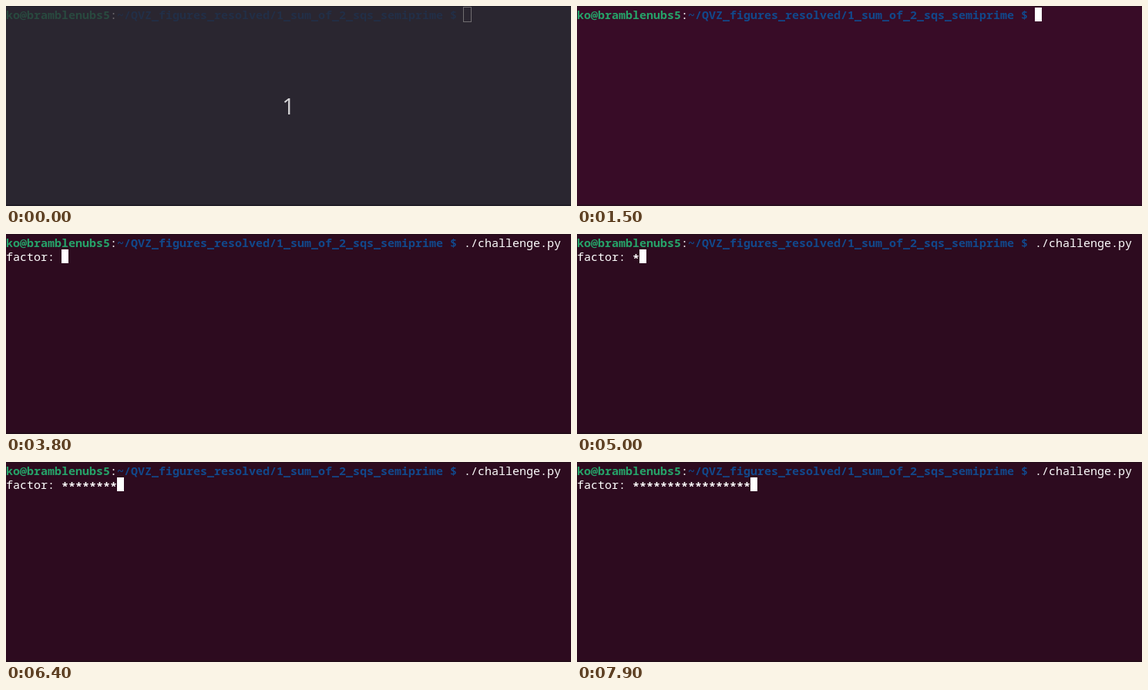
These frames come from a looping animation (733 by 260 pixels, 8 s). An HTML page:

```html
<!DOCTYPE html>
<html lang="en">
<head>
<meta charset="utf-8">
<title>Terminal</title>
<style>
  html, body { margin: 0; width: 100%; height: 100%; overflow: hidden; }
  svg {
    --bg: #2d0b1f; --edge: #230c1a; --user: #26a269; --path: #12488b; --ink: #fff;
    display: block; width: 733px; height: 260px; background: var(--bg);
  }
  svg.idle { --bg: #380c27; --edge: #2a0e20; }
  svg.dim {
    --bg: #2a2630; --edge: #201d27; --user: #29493f;
    --path: #222f47; --ink: #706d70;
  }
  text {
    font: 500 15px "Noto Sans Mono", "DejaVu Sans Mono", monospace;
    fill: var(--ink); white-space: pre;
  }
  .bold { font-weight: 700; }
  .user { fill: var(--user); }
  .path { fill: var(--path); }
  .edge { fill: var(--edge); }
  #stars { font-weight: 600; }
  #count { font: 29px "Open Sans", "Noto Sans", sans-serif; fill: #d6d5d7; text-anchor: middle; }
  #block { fill: #fff; }
  #hollow { fill: none; stroke: var(--ink); }
</style>
</head>
<body>
<svg id="term" class="dim" viewBox="0 0 733 260">
  <rect class="edge" width="733" height="1"/>
  <rect class="edge" y="258" width="733" height="2"/>
  <text class="bold user" x="0" y="17">ko@bramblenubs5</text>
  <text x="135" y="17">:</text>
  <text class="bold path" x="144" y="17">~/QVZ_figures_resolved/1_sum_of_2_sqs_semiprime $</text>
  <text id="command" x="594" y="17">./challenge.py</text>
  <text id="label" x="0" y="35">factor:</text>
  <text id="stars" x="72" y="37"></text>
  <rect id="hollow" x="593.5" y="1.5" width="10" height="19"/>
  <rect id="block" width="9" height="18"/>
  <text id="count" x="366.5" y="141">1</text>
</svg>
<script>
  const LOOP = 8000, TICK = 100, BLINK = 530;
  const CELL = 9, LINE = 18, TOP = 2, PROMPT_END = 66, LABEL_END = 8;
  const FOCUS = 1500, ENTER = 2600, LABEL = 3800, TYPING = 5000;

  // Typing pace: [time, stars typed]
  const pace = [[TYPING, 1], [5600, 2], [6600, 10], [7600, 14], [7900, 17]];

  const $ = id => document.getElementById(id);
  const show = (id, on) => $(id).setAttribute("visibility", on ? "visible" : "hidden");

  function starsAt(t) {
    if (t < TYPING) return 0;
    const next = pace.findIndex(point => point[0] > t);
    if (next < 0) return pace.at(-1)[1];
    const [t0, n0] = pace[next - 1], [t1, n1] = pace[next];
    return Math.floor(n0 + (n1 - n0) * (t - t0) / (t1 - t0));
  }

  // Output restarts the blink; typing keeps the cursor lit
  function cursorLit(t) {
    if (t < FOCUS) return false;
    if (t >= TYPING) return true;
    const since = t - (t < LABEL ? FOCUS : LABEL);
    return Math.floor(since / BLINK) % 2 === 0;
  }

  function draw(time) {
    const t = Math.floor(time / TICK) * TICK;
    const stars = starsAt(t);
    const row = t < ENTER ? 0 : 1;
    const col = t < ENTER ? PROMPT_END : t < LABEL ? 0 : LABEL_END + stars;

    $("term").setAttribute("class", t < TICK ? "dim" : t < FOCUS + TICK ? "idle" : "");
    show("count", t < TICK);
    show("hollow", t < FOCUS);
    show("command", t >= ENTER);
    show("label", t >= LABEL);
    show("block", cursorLit(t));
    $("block").setAttribute("x", col * CELL);
    $("block").setAttribute("y", TOP + row * LINE);
    $("stars").textContent = "*".repeat(stars);
  }

  let start;
  function frame(now) {
    start ??= now;
    draw((now - start) % LOOP);
    requestAnimationFrame(frame);
  }
  draw(0);
  requestAnimationFrame(frame);
</script>
</body>
</html>
```
